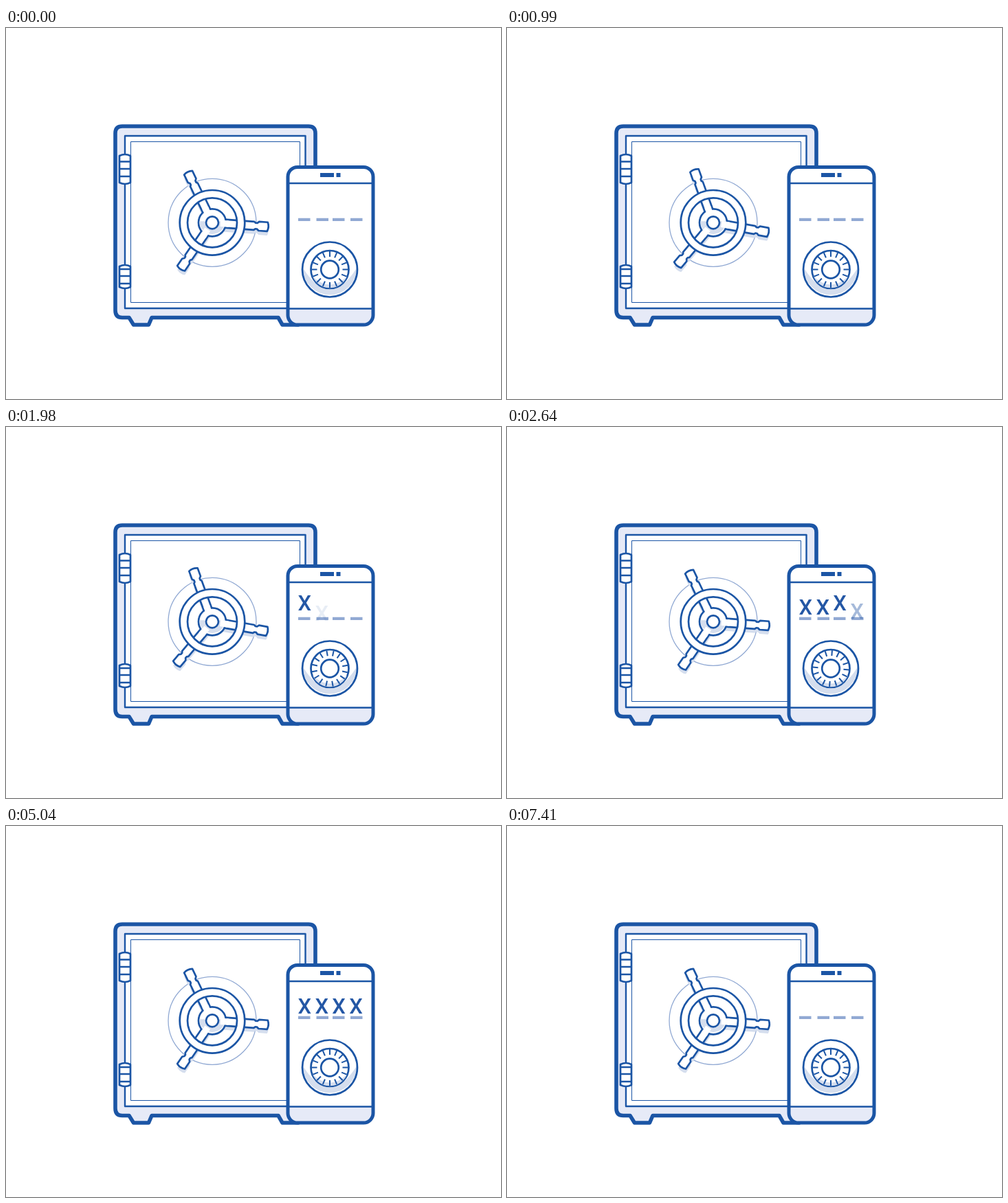
Recreate the animation shown at these times as an HTML page. Size 720 by 540 pixels, loop 8.97 s.

```html
<!DOCTYPE html>
<html lang="en">
<head>
<meta charset="utf-8">
<title>Safe and phone</title>
<style>
html, body { margin: 0; width: 100%; height: 100%; overflow: hidden; background: #fff; }
svg { display: block; width: 720px; height: 540px; }
.line { stroke: #1b55a5; stroke-width: 2.7; fill: none; stroke-linejoin: round; }
.white { fill: #fff; }
.pale { fill: #e6eaf7; }
.shade { fill: #d5deee; }
.solid { fill: #1b55a5; }
.soft { fill: #91a9d3; }
text { font: 500 31px Roboto, Arial, sans-serif; text-anchor: middle; fill: #2457a5; }
</style>
</head>
<body>
<svg viewBox="0 0 720 540">
  <defs>
    <path id="arm" d="M8 -6H61L63 -4.3H65.5L68 -6.6H80.5Q83.5 0 80.5 6.6H68L65.5 4.3H63L61 6H8Z"/>
    <g id="arms">
      <use href="#arm" transform="rotate(4.3)"/>
      <use href="#arm" transform="rotate(124.3)"/>
      <use href="#arm" transform="rotate(244.3)"/>
    </g>
    <clipPath id="screen"><rect x="410" y="202.5" width="124" height="229.5" rx="14"/></clipPath>
  </defs>

  <g id="safe" class="line">
    <path class="pale" stroke-width="6" style="stroke-width:5.6" d="M169 143H440Q450 143 450 153V411Q450 421.5 440 421.5H431L425 432H402L396 421.5H212L207.500 432H185.500L179 421.5H169Q159 421.5 159 411V153Q159 143 169 143Z"/>
    <rect class="white" x="173" y="157" width="262.500" height="251" style="stroke-width:2.4"/>
    <rect x="181.500" y="165.500" width="246" height="234" style="stroke-width:1"/>
    <path class="white" d="M165 186Q173 182 181 186V225Q173 229 165 225ZM165 194.500H181M165 205H181M165 216H181"/>
    <path class="white" d="M165 347Q173 343 181 347V377Q173 381 165 377ZM165 351H181M165 361H181M165 372H181"/>
  </g>

  <g transform="translate(300 283.300)">
    <circle r="64" fill="none" stroke="#91a9d3" stroke-width="1.300"/>
    <g transform="translate(0 6)"><use class="wheel shade" href="#arms"/></g>
    <use class="wheel line white" href="#arms"/>
    <circle r="41.700" fill="none" stroke="#fff" stroke-width="11"/>
    <g class="line">
      <circle r="47.300"/>
      <circle r="36"/>
      <circle class="white" r="20"/>
    </g>
    <path class="shade" d="M-18.700 -2A18.700 18.700 0 1 0 18.700 -2Z"/>
    <g class="wheel white" id="necks"></g>
    <circle class="line white" r="9"/>
  </g>

  <g id="phone">
    <rect class="white" x="410" y="202.500" width="124" height="229.500" rx="14"/>
    <rect class="pale" x="410" y="408" width="124" height="24" clip-path="url(#screen)"/>
    <path class="line" d="M410 226H534M410 408.500H534"/>
    <rect class="line" x="410" y="202.500" width="124" height="229.500" rx="14" style="stroke-width:5"/>
    <path class="solid" d="M457 211H477V217H457ZM480.500 211H486.500V217H480.500Z"/>
    <path class="soft" d="M425 276.700H442.500V281H425ZM451.500 276.700H469V281H451.500ZM475 276.700H492.500V281H475ZM501 276.700H518.500V281H501Z"/>
    <g id="code"></g>
    <g transform="translate(471 351.500)">
      <circle class="white" r="40"/>
      <path class="shade" d="M-39 -2A39 39 0 1 0 39 -2Q0 60 -39 -2Z"/>
      <circle class="line" r="40"/>
      <circle class="line white" r="27.500"/>
      <path class="shade" d="M-25 10A27 27 0 0 0 25 10Q0 34 -25 10Z"/>
      <g id="ticks" class="line" style="stroke-width:2"></g>
      <circle class="line white" r="12.800"/>
    </g>
  </g>
</svg>
<script>
const LOOP = 8970;
const $ = id => document.getElementById(id);
const clamp = v => Math.min(1, Math.max(0, v));
const part = (t, from, to) => clamp((t - from) / (to - from));
const inOut = (p, n) => p < .5 ? (2 * p) ** n / 2 : 1 - (2 - 2 * p) ** n / 2;
const times = (n, make) => Array.from({ length: n }, (_, i) => make(i)).join('');

$('necks').innerHTML = times(3, i =>
  `<rect x="12" y="-4.700" width="12" height="9.400" transform="rotate(${4.3 + i * 120})"/>`);
$('ticks').innerHTML = times(16, i =>
  `<path d="M18.500 0H26.500" transform="rotate(${i * 22.5})"/>`);
$('code').innerHTML = times(4, i => `<text x="${434.3 + i * 24.9}" y="273">X</text>`);

const wheels = document.querySelectorAll('.wheel');
const marks = document.querySelectorAll('#code text');

function draw(t) {
  // wheel swings open and back
  const turn = 150 * (inOut(part(t, 450, 1350), 5) - inOut(part(t, 1350, 2250), 5));
  wheels.forEach(w => w.setAttribute('transform', `rotate(${turn})`));
  $('ticks').setAttribute('transform', `rotate(${202.5 * inOut(part(t, 1350, 3150), 3)})`);

  // each mark pops up past its place, settles, then all sink away
  const out = part(t, 6750, 7400);
  marks.forEach((m, i) => {
    const start = 1620 + i * 300;
    const rise = inOut(part(t, start, start + 330), 2);
    const settle = inOut(part(t, start + 360, start + 700), 2);
    const y = 10 - 16.5 * rise + 6.5 * settle + 8 * out * out;
    m.setAttribute('transform', `translate(0 ${y})`);
    m.setAttribute('opacity', clamp(rise * 1.5) * (1 - out));
  });
}

const begin = performance.now();
function tick() {
  draw((performance.now() - begin) % LOOP);
  requestAnimationFrame(tick);
}
tick();
</script>
</body>
</html>
```
